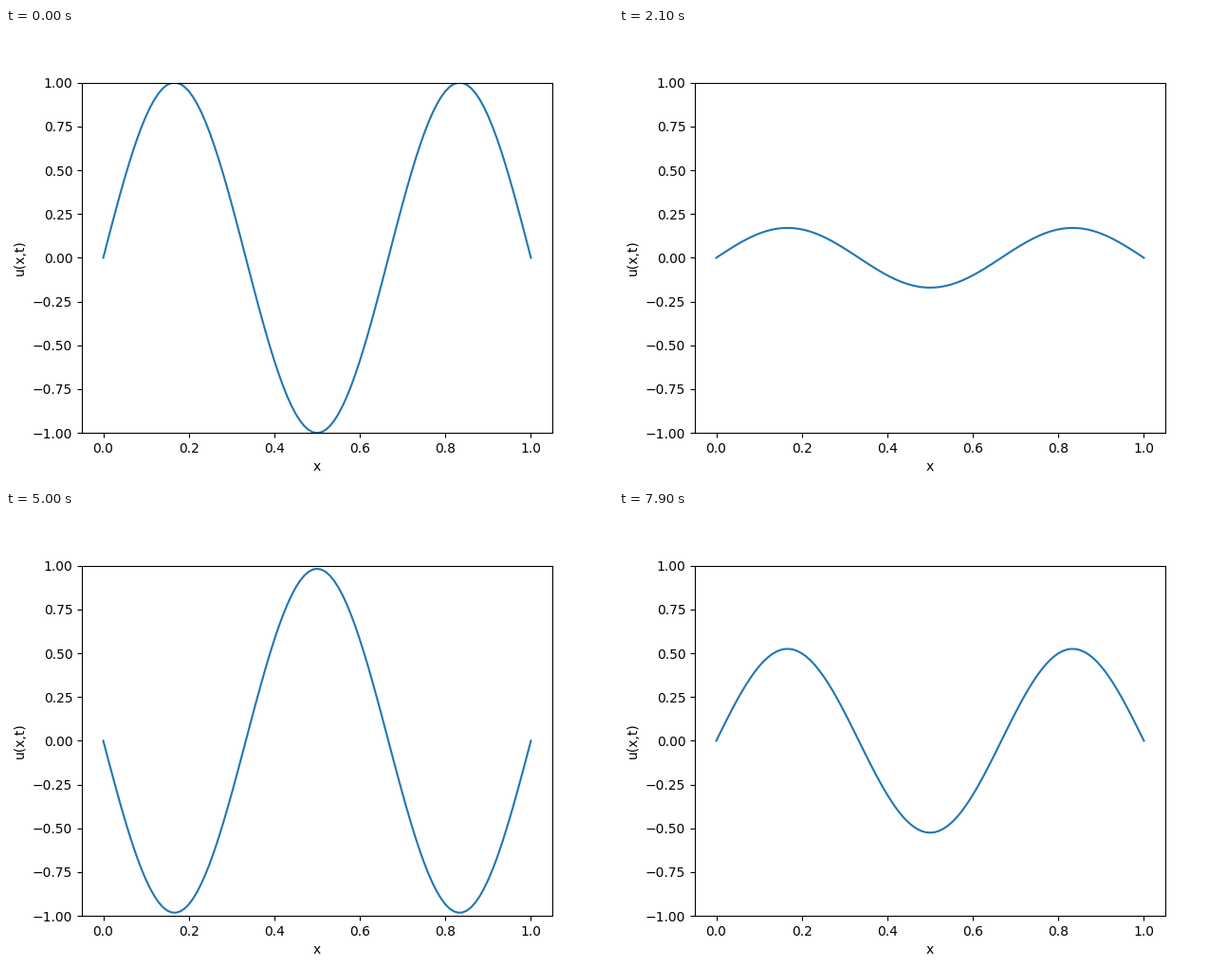
A matplotlib script that plays this animation: 640x480 px, repeating every 8000 ms.

```python
import numpy as np
import matplotlib.pyplot as plt
from matplotlib.animation import FuncAnimation

FRAMES = 80
INTERVAL = 100                 # ms
MODE = 3                       # half waves along the string
STEP = 0.01 / np.sqrt(2)       # wave speed times time step

x = np.linspace(0, 1, 101)
shape = np.sin(MODE * np.pi * x)

fig, ax = plt.subplots(figsize=(6.4, 4.8), dpi=100)
line, = ax.plot(x, shape)
ax.set_ylim(-1, 1)
ax.set_xlabel("x")
ax.set_ylabel("u(x,t)")


def update(i):
    """Standing wave u = sin(k x) cos(k c t)."""
    line.set_ydata(shape * np.cos(MODE * np.pi * STEP * i))
    return line,


anim = FuncAnimation(fig, update, frames=FRAMES, interval=INTERVAL,
                     init_func=lambda: update(0), repeat=True, repeat_delay=0)
plt.show()
```
